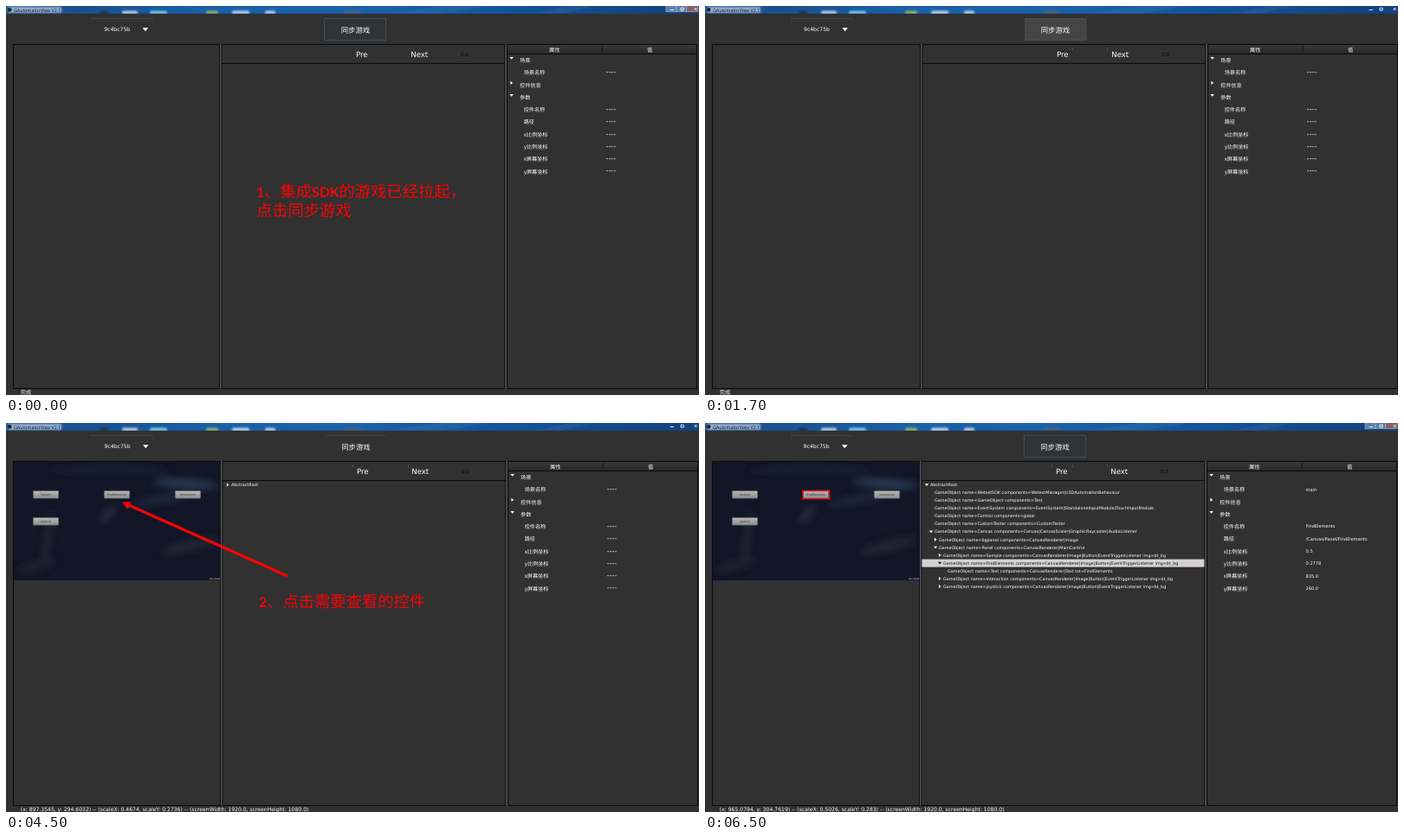
These frames come from a looping animation (800 px wide and 450 px high, 8000 ms). An HTML page:

```html
<!DOCTYPE html>
<html>
<head>
<meta charset="utf-8">
<title>Control viewer</title>
<style>
html, body { margin: 0; width: 100%; height: 100%; overflow: hidden; background: #313131; }
svg { display: block; width: 100vw; height: 100vh; }
text { font-family: "DejaVu Sans", "Noto Sans CJK SC", sans-serif; fill: #fff; white-space: pre; text-rendering: geometricPrecision; }
.cjk { font-family: "Noto Sans CJK SC", "Noto Sans CJK", sans-serif; }
.title { font-family: "Open Sans", sans-serif; fill: #0a1018; }
.note { font-family: "Noto Sans CJK SC", "Noto Sans CJK", sans-serif; font-size: 18.3px; fill: #f80404; }
.note tspan { font-family: Lato, sans-serif; font-weight: 700; font-size: 15.8px; }
.scene { opacity: 0; animation: 8s step-end infinite; }
#s0 { animation-name: a0; }
#s1 { animation-name: a1; }
#s2 { animation-name: a2; }
#s3 { animation-name: a3; }
#s4 { animation-name: a4; }
@keyframes a0 { 0% { opacity: 1 } 6.25%, 100% { opacity: 0 } }
@keyframes a1 { 0% { opacity: 0 } 6.25% { opacity: 1 } 31.25%, 100% { opacity: 0 } }
@keyframes a2 { 0% { opacity: 0 } 31.25% { opacity: 1 } 56.25%, 100% { opacity: 0 } }
@keyframes a3 { 0% { opacity: 0 } 56.25% { opacity: 1 } 81.25%, 100% { opacity: 0 } }
@keyframes a4 { 0% { opacity: 0 } 81.25%, 100% { opacity: 1 } }
</style>
</head>
<body>
<svg id="stage" viewBox="0 0 800 450" preserveAspectRatio="none">
  <defs>
    <linearGradient id="bar">
      <stop offset="0" stop-color="#2b5a92"/><stop offset=".1" stop-color="#1b5090"/>
      <stop offset=".3" stop-color="#1a60a8"/><stop offset=".5" stop-color="#1a62aa"/>
      <stop offset=".72" stop-color="#15539a"/><stop offset="1" stop-color="#12427c"/>
    </linearGradient>
    <linearGradient id="btn" x2="0" y2="1">
      <stop offset="0" stop-color="#b8b8b8"/><stop offset="1" stop-color="#8c8c8c"/>
    </linearGradient>
    <linearGradient id="head" x2="0" y2="1">
      <stop offset="0" stop-color="#383838"/><stop offset="1" stop-color="#282828"/>
    </linearGradient>
    <filter id="soft" x="-5%" y="-50%" width="110%" height="200%"><feGaussianBlur stdDeviation="1.2"/></filter>
    <filter id="mist" x="-20%" y="-20%" width="140%" height="140%"><feGaussianBlur stdDeviation="4.5"/></filter>
    <clipPath id="shot"><rect x="9" y="45" width="238.7" height="137"/></clipPath>
    <clipPath id="strip"><rect width="800" height="9"/></clipPath>
  </defs>
</svg>
<script>
const rect = (x, y, w, h, fill, more = '') =>
  `<rect x="${x}" y="${y}" width="${w}" height="${h}" fill="${fill}" ${more}/>`;
const path = (d, stroke, w = 1, more = '') =>
  `<path d="${d}" fill="none" stroke="${stroke}" stroke-width="${w}" ${more}/>`;
const text = (x, y, size, str, more = '') =>
  `<text x="${x}" y="${y}" font-size="${size}" ${more}>${str}</text>`;
const cjk = (x, y, size, str, more = '') => text(x, y, size, str, 'class="cjk" ' + more);
const oval = (x, y, rx, ry, fill, more = '') =>
  `<ellipse cx="${x}" cy="${y}" rx="${rx}" ry="${ry}" fill="${fill}" ${more}/>`;
const arrow = (x, y, open, fill = '#fff') =>
  `<path fill="${fill}" d="M${x} ${y}${open ? 'm-2.2-1.2h4.4l-2.2 2.7z' : 'm-1.2-2.2v4.4l2.7-2.2z'}"/>`;
const INK = '#0b0b0b', BG = '#313131';

function titleBar(framed) {
  const blurs = [[113, 5, '#26303c'], [143, 9, '#c9dcf0'], [176, 10, '#8fd0ee'], [238, 7, '#a3b96a'],
    [271, 10, '#d3e2f2'], [305, 6, '#cfdcec'], [400, 10, '#4b6179']];
  let s = rect(0, 0, 800, 9, 'url(#bar)');
  s += '<path d="M440 9L500 0H560L500 9zM610 9L650 0H680L640 9z" fill="#fff" opacity=".05"/>';
  s += '<g filter="url(#soft)">' + blurs.map(([x, w, c]) => rect(x - w, 5.5, 2 * w, 6, c, 'rx="2" opacity=".85"')).join('') +
    rect(3, 1, 61, 7, '#b9cde4', 'opacity=".75"') + '</g>';
  s += '<circle cx="4.2" cy="4.3" r="2.4" fill="#1d2a25"/>' + text(9, 6.5, 5.3, 'GAutomatorView V2.1', 'class="title"');
  if (framed) s += [[762, 12], [774, 11.5], [785.5, 13.5]].map(([x, w]) =>
    rect(x, -1, w, 7.5, x > 780 ? '#8b5f62' : '#5f7fa8', 'stroke="#a9bdd4" stroke-width=".6"')).join('');
  s += path('M766.5 4.5h4.5M779 2.2h3.2v2.8h-3.2zM794.7 2l3 3m0-3l-3 3', '#f2f6fa', .9);
  return `<g clip-path="url(#strip)">${s}</g>` + rect(0, 8.7, 800, .7, '#243850');
}

function panels(dx, bottom, dy) {
  const x = n => n + dx, h = bottom - 44.5;
  const edge = 'stroke="' + INK + '" stroke-width="1.1"';
  let s = rect(8.5, 44.5, 239.2 + dx, h, BG, edge) +
    rect(x(249.8), 44.5, 327, h, BG, edge) +
    rect(x(579.5), 44.5, 219, h, BG, edge);
  s += path(`M${x(248.8)} 44V${bottom}M${x(578)} 44V${bottom}`, '#737373', .9);
  s += path(`M${x(250)} ${66.5 + dy}H${x(577)}`, INK, 1.1);
  s += rect(x(580), 45, 218, 10, 'url(#head)') + path(`M${x(580)} 55.5h218`, INK, 1);
  s += path(`M${x(689.2)} 46v8`, '#111', .8);
  s += cjk(x(628), 52.6, 6.2, '属性') + cjk(x(741), 52.6, 6.2, '值');
  return s;
}

function properties(dx, pitch, values) {
  const rows = ['场景', ' 场景名称', '控件信息', '参数', ' 控件名称', ' 路径',
    ' x比例坐标', ' y比例坐标', ' x屏幕坐标', ' y屏幕坐标'];
  let n = 0;
  return rows.map((label, i) => {
    const y = 62.6 + (pitch > 14.4 ? .7 : 0) + i * pitch;
    if (label[0] != ' ') return arrow(584.6 + dx, y - 2.3, i != 2) + cjk(594 + dx, y + 2.3, 6.15, label);
    const v = values[n++];
    return cjk(598.7 + dx, y + 2.3, 6.15, label.trim()) +
      (v ? text(693.6 + dx, y + 1.6, 5.05, v) : text(693.6 + dx, y + 2.1, 8, '----'));
  }).join('');
}

function frame(o) {
  const { dx = 0, dy = 0, bottom = 442.5, pitch = 14.3, values = [] } = o;
  let s = rect(0, 0, 800, 450, BG) + titleBar(o.framed) + panels(dx, bottom, dy);
  s += path('M99 14.5h70', '#484848', .8) + path('M99.5 15v5M169.5 15v5', '#3e3e3e', .7);
  s += text(113.6 + dx * .4, 29.4, 6.1, '9c4bc75b') +
    `<path d="M${158 + dx * .4} 25.2h6.6l-3.3 4z" fill="#fff"/>`;
  s += o.button + cjk(387.2 + dx * .5, 30.5, 8.4, '同步游戏');
  s += path(o.ticks || '', '#565656', .8);
  s += text(405 + dx, 58.8 + dy, 8.5, 'Pre') + text(468.3 + dx, 58.8 + dy, 8.5, 'Next');
  s += text(526 + dx, 57.5 + dy, 5.6, '0,0', 'style="fill:#050505"');
  s += properties(dx, pitch, values);
  s += /^\(/.test(o.status) ? text(16.8, 448.9, 6.08, o.status) : cjk(16.8, 449.2 + dy * 5.8, 6.2, o.status);
  return s + (o.body || '');
}

function gameShot() {
  const mist = [[208, 70, 38, 5, '#36506c', .7, 4], [180, 88, 40, 5, '#262f42', .7, -10], [212, 142, 34, 6, '#272c38', .8, -14],
    [48, 135, 4, 34, '#262b38', .8, 8], [118, 106, 13, 4, '#363c48', .7, -50], [35, 165, 24, 5, '#222734', .7, -15],
    [120, 54, 70, 5, '#17223a', .7, 0]];
  let s = rect(9, 45, 238.7, 137, '#121627') + '<g filter="url(#mist)">' +
    mist.map(([x, y, rx, ry, c, a, r]) => oval(x, y, rx, ry, c, `opacity="${a}" transform="rotate(${r} ${x} ${y})"`)).join('') + '</g>';
  const keys = [[31, 78, 'Sample'], [113, 78, 'FindElements'], [195, 78, 'Interaction'], [31, 109, 'joystick']];
  s += keys.map(([x, y, t]) => rect(x + .3, y + .4, 29.4, 8.8, 'url(#btn)', 'rx=".8" stroke="#555" stroke-width=".5"') +
    text(x + 15, y + 6, 3.3, t, 'text-anchor="middle" style="fill:#333"')).join('');
  s += text(247, 181.4, 2.4, 'Dev. Build', 'text-anchor="end"');
  return `<g clip-path="url(#shot)">${s}</g>`;
}

function spinner(cx, cy) {
  let s = '';
  for (let i = 0; i < 12; i++) {
    const a = (15 - i * 30) * Math.PI / 180, k = 1 - i / 11;
    const mix = (lo, hi) => Math.round(lo + (hi - lo) * k);
    s += `<circle cx="${cx + 13.3 * Math.cos(a)}" cy="${cy + 13.3 * Math.sin(a)}" r="2.2" fill="rgb(${mix(50, 8)},${mix(62, 146)},${mix(88, 190)})"/>`;
  }
  return s;
}

// Each row: depth, arrow (- open, + closed, blank leaf), name, components
function tree() {
  const ui = 'CanvasRenderer|Image|Button|EventTriggerListener img=bt_bg';
  const rows = [
    [1, '', 'WetestSDK', 'WetestManager|U3DAutomationBehaviour'],
    [1, '', 'GameObject', 'Test'],
    [1, '', 'EventSystem', 'EventSystem|StandaloneInputModule|TouchInputModule'],
    [1, '', 'Control', 'gobal'],
    [1, '', 'CustomTester', 'CustomTester'],
    [1, '-', 'Canvas', 'Canvas|CanvasScaler|GraphicRaycaster|AudioListener'],
    [2, '+', 'bgpanel', 'CanvasRenderer|Image'],
    [2, '-', 'Panel', 'CanvasRenderer|MainControl'],
    [3, '+', 'Sample', ui],
    [3, '-', 'FindElements', ui],
    [4, '', 'Text', 'CanvasRenderer|Text txt=FindElements'],
    [3, '+', 'Interaction', ui],
    [3, '+', 'joystick', ui]];
  let s = rect(250.4, 157.6, 326, 9, '#d5d1d4');
  rows.forEach(([depth, mark, name, parts], i) => {
    const y = 80.5 + i * 9.05, x = 260 + depth * 5.03, ink = name == 'FindElements' ? '#151515' : '#fff';
    if (mark) s += arrow(x - 4, y, mark == '-', ink);
    s += text(x, y + 1.7, 4.84, `GameObject name=${name} components=${parts}`, `style="fill:${ink}"`);
  });
  return s;
}

const root = open => arrow(256, 71.5, open) + text(260, 73.2, 4.84, 'AbstractRoot');
const note = (x, y, str) => `<text class="note" x="${x}" y="${y}">${str}</text>`;
const outline = x => rect(x, 14.3, 71, 25.4, '#323334', 'stroke="#42535f" stroke-width=".9"');

const scenes = [
  frame({
    dx: -1, framed: true, status: '完成', button: outline(367.5),
    body: note(289, 220.5, '<tspan>1</tspan>、集成<tspan>SDK</tspan>的游戏已经拉起，') + note(289, 243, '点击同步游戏')
  }),
  frame({
    dx: 1, status: '完成', ticks: 'M424.5 48v4M464.5 48v4',
    button: rect(369.5, 14.3, 70.5, 25.4, '#454545', 'stroke="#565656" stroke-width=".7"')
  }),
  frame({
    dy: 1, bottom: 448.3, pitch: 14.52, status: '完成', button: path('M438.5 15v4', '#4a4a4a', .8),
    ticks: 'M400.5 54v-5.5h23.5v5.5M463.5 54v-5.5h30v5.5',
    body: spinner(318, 159.2) + cjk(394, 161.6, 6.1, '正在获取游戏图像....')
  }),
  frame({
    status: '(x: 897.3545, y: 294.6032) -- (scaleX: 0.4674, scaleY: 0.2736) -- (screenWidth: 1920.0, screenHeight: 1080.0)',
    button: path('M369 14.4h69', '#4a4a4a', .8), ticks: 'M400.5 48v4M464.5 48v4',
    body: gameShot() + root(false) + path('M325 177L141 94.7', '#f80404', 3.2) +
      '<path d="M134 91.5L144.5 91.2L140.5 100z" fill="#f80404"/>' + note(292, 213, '<tspan>2</tspan>、点击需要查看的控件')
  }),
  frame({
    framed: true, button: outline(368.3), ticks: 'M400.5 48v4M424.5 48v4M464.5 48v4',
    status: '(x: 965.0794, y: 304.7619) -- (scaleX: 0.5026, scaleY: 0.283) -- (screenWidth: 1920.0, screenHeight: 1080.0)',
    values: ['main', 'FindElements', '/Canvas/Panel/FindElements', '0.5', '0.2778', '835.0', '260.0'],
    body: gameShot() + rect(113, 78.4, 30.5, 9.2, 'none', 'stroke="#f01010" stroke-width="1.5"') + root(true) + tree()
  })];

document.getElementById('stage').insertAdjacentHTML('beforeend',
  scenes.map((s, i) => `<g class="scene" id="s${i}">${s}</g>`).join(''));
</script>
</body>
</html>
```
